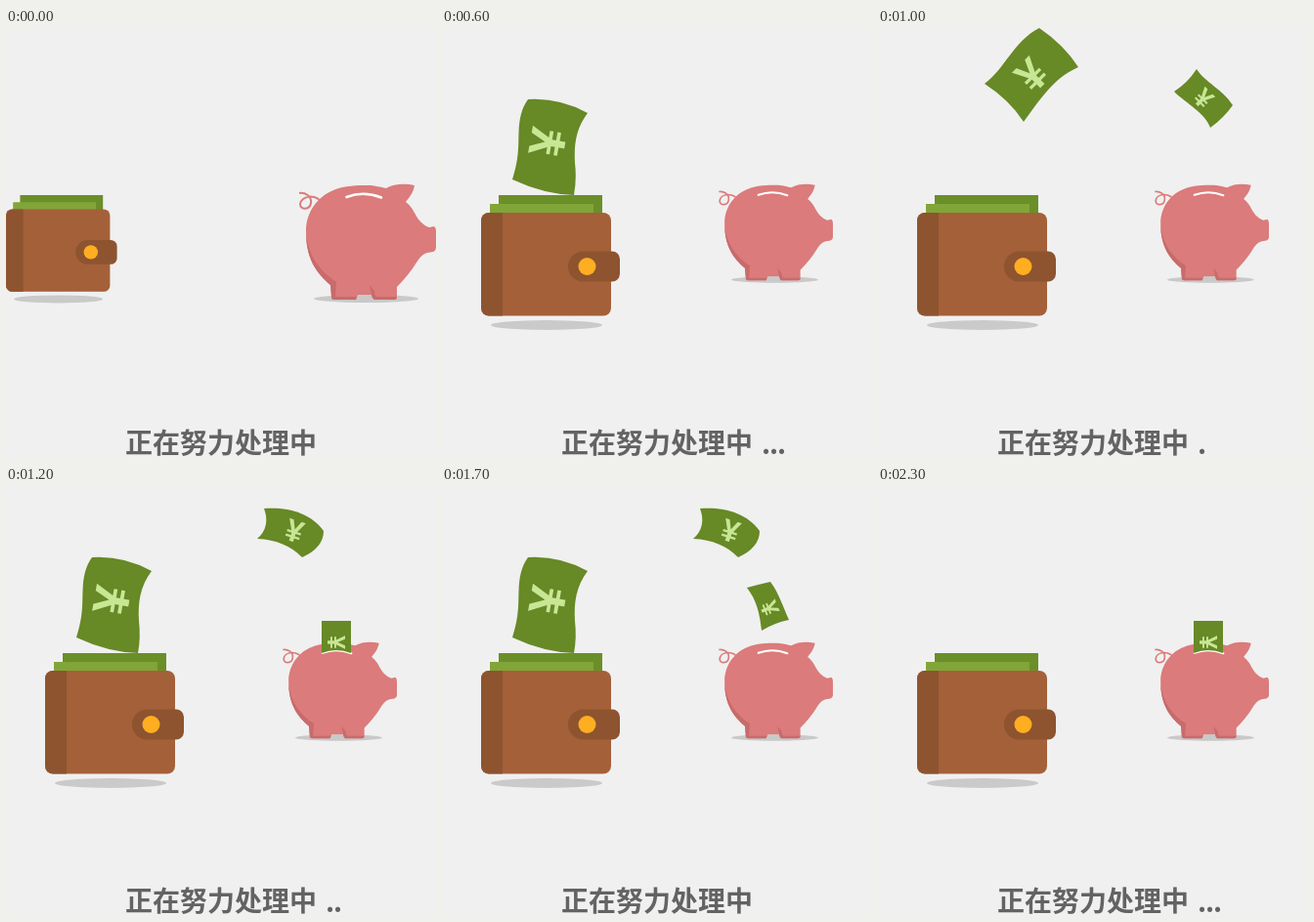
Animation, 440 px wide and 440 px high, one loop 2400 ms. Source, as an HTML page:

```html
<!DOCTYPE html>
<html lang="zh">
<meta charset="utf-8">
<style>
  html, body { margin: 0; width: 100%; height: 100%; overflow: hidden; background: #f0f0f0; }
  svg { display: block; width: 100%; height: 100%; }
  .label { font: 700 28px "Noto Sans CJK SC", "Noto Sans CJK", sans-serif; fill: #636363; }
  .note path { fill: #678926; }
  .note text { font-family: "Liberation Sans", Arial, sans-serif; font-weight: 700; fill: #c9e695; text-anchor: middle; }
</style>
<svg viewBox="0 0 440 440">
  <g id="wallet">
    <ellipse cx="67" cy="133" rx="57" ry="5" fill="#cacaca"/>
    <path fill="#6a8f28" d="M18 0h106v20H18z"/>
    <path fill="#81a538" d="M9 9h106v12H9z"/>
    <rect y="18" width="133" height="105.5" rx="8" fill="#a46039"/>
    <path fill="#8d542f" d="M22 18v105.5H8a8 8 0 0 1-8-8V26a8 8 0 0 1 8-8z"/>
    <path fill="#8d542f" d="M104.500 57.500H134a8 8 0 0 1 8 8v15a8 8 0 0 1-8 8H104.500a15.500 15.500 0 0 1 0-31z"/>
    <circle cx="108.500" cy="73" r="9" fill="#ffae21"/>
  </g>
  <g id="pig">
    <g transform="scale(.83333) translate(-440 -160)">
      <ellipse cx="368.500" cy="277" rx="53.500" ry="4" fill="#c9c9c9"/>
      <path fill="none" stroke="#db7b7b" stroke-width="2" d="M325 181C317 168 302 172 301 180C301 187 311 186 312 179C313 172 306 168 300 169"/>
      <path fill="#db7b7b" d="M307 208C307 187 320 172 335 166C347 161 360 161 370 161C378 161 383 163 389 164
        C397 159 409 159 418 161C417 168 413 173 409 178C418 185 417 190 424 198Q429 203 433 204L438 203Q440 204 440 208V224
        Q440 228 437 229L431 230C425 232 423 236 420 240C415 248 408 257 400 265V275Q400 278 397 278H378Q375 278 374 273H360
        L358 278H336Q333 278 333 275L332 263C317 250 307 236 307 208z"/>
      <path fill="#c76b6c" d="M307 212C308 238 319 252 332 263L333 275Q333 278 336 278H358L359 275H337L338 260C320 248 310 233 307 212z
        M372 263L374 273Q375 278 378 278H397Q400 278 400 275H381Q377 275 377 269z"/>
      <path fill="none" stroke="#fff" stroke-width="2.500" stroke-linecap="round" d="M348.500 173Q366 166.500 384 173.500"/>
    </g>
  </g>
  <g id="notes"></g>
  <text class="label" x="122" y="435">正在努力处理中</text>
  <text class="label" id="dots" x="327 335 343" y="436"></text>
</svg>
<script>
const byId = id => document.getElementById(id);

// Stations of a banknote's flight: outline, then the sign's x, y, angle and size
const stations = [
  ['M72 155C79 133 78 122 78.500 108C79 93 81 83 88 73Q120 71 149 87C137 103 135 119 136 138Q138 155 135 171Q104 170 72 155z', 108, 117, -80, 52],
  ['M109 57C130 42 138 14 165 0Q190 17 205 40C178 52 165 75 149 96Q135 74 109 57z', 157, 48, -45, 46],
  ['M194 17C218 17 236 5 267 7Q267 29 273 50C246 47 225 51 199 64Q203 39 194 17z', 231.5, 33, -10, 40],
  ['M264 23C287 21 312 27 325 46Q325 63 303 73C291 61 277 55 257 54Q271 42 264 23z', 295, 46, 18, 32],
  ['M326 42C335 56 352 62 363 79Q354 92 340 102C334 86 316 78 303 65Q317 56 326 42z', 333, 72, 45, 28],
  ['M336 98C345 110 349 124 355 137Q340 140 327 148C325 130 322 117 312 104Q323 101 336 98z', 335, 125, 68, 25],
  ['M323 138H353V171Q338 165 323 171z', 338, 160, 90, 25]
];
const launches = [600, 900, 1200, 1400, 1700];

byId('notes').innerHTML = stations.map(([d, x, y, angle, size]) =>
  `<g class="note"><path d="${d}"/><text transform="translate(${x} ${y}) rotate(${angle})"
    y="${size * .345}" font-size="${size}">¥</text></g>`).join('');
const notes = [...byId('notes').children];

function draw() {
  const t = performance.now() % 2400;
  const pose = t < 230 ? 0 : t < 430 ? 1 : 2;
  byId('wallet').setAttribute('transform', `translate(${pose * 20} 171) scale(${.8 + pose * .1})`);
  byId('pig').setAttribute('transform', `translate(${440 - pose * 20} 160) scale(${1.2 - pose * .1})`);
  notes.forEach((note, i) => {
    const shown = launches.some(start => Math.floor((t - start) / 100) === i);
    note.style.display = shown ? '' : 'none';
  });
  byId('dots').textContent = '.'.repeat(Math.floor(t / 200) % 4);
  requestAnimationFrame(draw);
}
draw();
</script>
</html>
```
